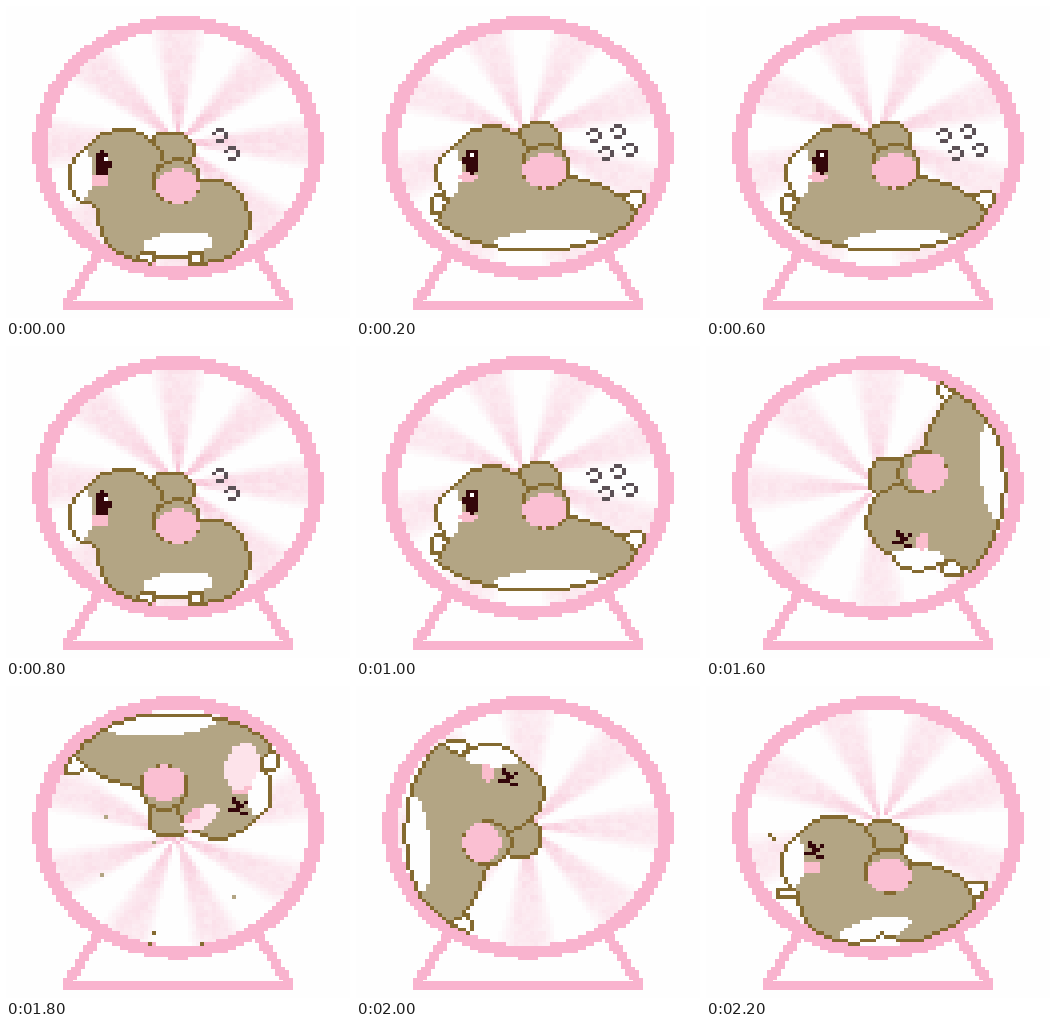
An HTML page with a canvas that plays this animation: 344 px wide and 312 px high, repeating every 2400 ms.

```html
<!DOCTYPE html>
<html lang="en">
<head>
<meta charset="utf-8">
<title>Hamster wheel</title>
<style>
html, body { margin: 0; width: 100%; height: 100%; overflow: hidden; background: #fefefe; }
canvas { display: block; width: 344px; height: 312px; }
</style>
</head>
<body>
<canvas id="stage" width="344" height="312"></canvas>
<script>
const ctx = document.getElementById('stage').getContext('2d');

// Coarse pixel grid: cells are slightly wider than tall.
const CW = 4, CH = 3.628, X0 = -2, Y0 = -1.33, N = 88;
const CX = 172, CY = 141.5;
const PINK = '#f9b3ce', EAR = '#fabfd2', CHEEK = '#fabdcc', FUR = '#b3a584',
      LINE = '#846a30', WHITE = '#fefefe', DARK = '#34060a', SWEAT = '#5c5156',
      BLUSH = '#fde3ea';

const midX = i => X0 + (i + 0.5) * CW;
const midY = j => Y0 + (j + 0.5) * CH;

// Shapes are tests on a point, combined with any / both / minus.
function oval(x, y, rx, ry, tilt = 0) {
  const c = Math.cos(tilt), s = Math.sin(tilt);
  return (px, py) => {
    const dx = px - x, dy = py - y;
    return Math.hypot((dx * c + dy * s) / rx, (dy * c - dx * s) / ry) < 1;
  };
}
const any = (...fs) => (x, y) => fs.some(f => f(x, y));
const both = (a, b) => (x, y) => a(x, y) && b(x, y);
const minus = (a, b) => (x, y) => a(x, y) && !b(x, y);

const rim = oval(CX, CY, 145, 131.5);
const hole = oval(CX, CY, 130, 118);
const reach = oval(CX, CY, 133, 120);

// Rotation about the hub in grid proportions, then a shift.
let spin = { angle: 0, dx: 0, dy: 0 };
function rotate(x, y, angle) {
  const u = (x - CX) / CW, v = (y - CY) / CH, c = Math.cos(angle), s = Math.sin(angle);
  return [CX + (u * c - v * s) * CW, CY + (u * s + v * c) * CH];
}
const toLocal = (x, y) => rotate(x - spin.dx, y - spin.dy, -spin.angle);
function toStage(x, y) {
  const [a, b] = rotate(x, y, spin.angle);
  return [a + spin.dx, b + spin.dy];
}

function cell(i, j, color, pad = 0) {
  const x = Math.round(X0 + i * CW), y = Math.round(Y0 + j * CH);
  const w = Math.round(X0 + (i + 1) * CW) - x, h = Math.round(Y0 + (j + 1) * CH) - y;
  ctx.fillStyle = color;
  ctx.fillRect(x - pad, y - pad, w + 2 * pad, h + 2 * pad);
}

function eachCell(fn) {
  for (let j = 0; j < N; j++) for (let i = 0; i < N; i++) fn(i, j, midX(i), midY(j));
}

function fill(shape, color) {
  const mask = new Uint8Array(N * N);
  eachCell((i, j, x, y) => {
    if (!reach(x, y) || !shape(...toLocal(x, y))) return;
    mask[j * N + i] = 1;
    cell(i, j, color);
  });
  return mask;
}

function outline(mask) {
  eachCell((i, j) => {
    const k = j * N + i;
    if (mask[k] && !(mask[k - 1] && mask[k + 1] && mask[k - N] && mask[k + N])) cell(i, j, LINE);
  });
}

const inked = (shape, color) => outline(fill(shape, color));

function stamp(x, y, rows, color) {
  [x, y] = toStage(x, y);
  const i0 = Math.round((x - X0) / CW - rows[0].length / 2);
  const j0 = Math.round((y - Y0) / CH - rows.length / 2);
  rows.forEach((row, j) => [...row].forEach((c, i) => { if (c === '#') cell(i0 + i, j0 + j, color); }));
}

const DROP = ['.##.', '#..#', '...#', '.##.'];
const CROSS = ['.#...', '.##.#', '..##.', '###..', '...##'];
const dots = (color, ...at) => at.forEach(([x, y]) => stamp(x, y, ['#'], color));
const drops = (...at) => at.forEach(([x, y]) => stamp(x, y, DROP, SWEAT));

function hash(i, j) {
  const v = Math.sin(i * 127.1 + j * 311.7) * 43758.5453;
  return v - Math.floor(v);
}

// Soft blotchy rays, eight around the hub.
function rays(phase, power, hubX, hubY) {
  eachCell((i, j, x, y) => {
    if (!hole(x, y)) return;
    const dx = (x - hubX) / CW, dy = (y - hubY) / CH, r = Math.hypot(dx, dy) / 32;
    const a = Math.atan2(dx, -dy) * 180 / Math.PI - phase;
    const off = a - 45 * Math.round(a / 45);
    const grain = 0.7 + 0.25 * hash(i, j) + 0.35 * hash(i >> 1, j >> 1);
    const s = power * grain * Math.exp(-Math.pow(off / 11, 4)) * (0.28 + 0.65 * Math.exp(-r * 3.5));
    if (s > 0.03) cell(i, j, `rgb(${254 - 7 * s | 0},${254 - 80 * s | 0},${254 - 54 * s | 0})`);
  });
}

function wheel(phase, power, hubX, hubY) {
  ctx.fillStyle = WHITE;
  ctx.fillRect(0, 0, 344, 312);
  eachCell((i, j, x, y) => {
    const t = (y - 246) / 52, lean = Math.abs(x - CX);
    const leg = t > 0 && t < 1 && Math.abs(lean - (78 + 33 * t)) < 4.5;
    const bar = y > 295 && y < 305 && lean < 115;
    if (!rim(x, y) && (leg || bar)) cell(i, j, PINK, 1);
  });
  eachCell((i, j, x, y) => { if (rim(x, y)) cell(i, j, hole(x, y) ? WHITE : PINK); });
  rays(phase, power, hubX, hubY);
}

// The face and ears hang off the head; drop lowers the ears.
function hamster({ head: [x, y], drop, trunk, belly, limbs = [], feet = [], dizzy }) {
  const earX = x + 54, earY = y + drop;
  const skull = any(oval(x, y, 45, 46), oval(x - 35, y + 3, 21, 27));
  const shape = any(skull, trunk);
  limbs.forEach(limb => inked(limb, WHITE));
  inked(oval(x + 48, y - 30 + drop / 2, 24, 20), FUR);
  const mask = fill(shape, FUR);
  fill(both(shape, any(oval(x - 47, y, 17, 30), belly)), WHITE);
  outline(mask);
  feet.forEach(foot => inked(foot, WHITE));
  fill(oval(x - 23, y + 6, 10, 6), CHEEK);
  if (dizzy) {
    stamp(x - 20, y - 11, CROSS, DARK);
  } else {
    fill(oval(x - 20, y - 10, 7.5, 13), DARK);
    dots(WHITE, [x - 18, y - 14]);
  }
  inked(oval(earX, earY - 5, 25, 23), FUR);
  fill(oval(earX, earY, 22, 17), EAR);
}

function run() {
  wheel(0, 1, 172, 137);
  hamster({
    head: [117, 168], drop: 12,
    trunk: minus(any(oval(145, 206, 55, 53), oval(200, 215, 45, 44)), oval(165, 263, 22, 12)),
    belly: oval(172, 238, 36, 12, -0.1),
    feet: [oval(141, 252, 10, 8), oval(190, 252, 10, 8)]
  });
  drops([214, 131], [225, 149]);
}

const stretch = (drop, dizzy) => hamster({
  head: [135, 165], drop, dizzy,
  trunk: both(oval(178, 185, 112, 62), oval(182, 225, 105, 58)),
  belly: oval(190, 236, 55, 13, -0.08),
  limbs: [oval(83, 199, 10, 12), oval(276, 195, 15, 10, -0.6)]
});

function leap(sweating) {
  wheel(25, 0.85, 170, 130);
  stretch(0, false);
  if (sweating) drops([237, 128], [261, 124], [249, 146], [272, 142]);
}

// Thrown round by the wheel, a number of quarter turns.
function carried(quarters, dx, dy) {
  spin = { angle: quarters * Math.PI / 2, dx, dy };
  stretch(11, true);
  spin = { angle: 0, dx: 0, dy: 0 };
}

function overhead() {
  wheel(25, 0.9, 170, 150);
  carried(2, 3, -10);
  fill(oval(236, 80, 17, 24, 0.3), BLUSH);
  fill(oval(194, 132, 20, 10, -0.5), BLUSH);
  fill(oval(186, 130, 11, 5, -0.5), EAR);
  dots(FUR, [101, 130], [94, 188], [147, 157], [227, 212]);
  dots(LINE, [147, 247], [142, 257], [194, 257]);
}

function landed() {
  wheel(26, 0.85, 175, 136);
  hamster({
    head: [129, 175], drop: 15, dizzy: true,
    trunk: any(oval(145, 212, 54, 47), oval(210, 217, 59, 40)),
    belly: oval(170, 243, 36, 11, -0.2),
    limbs: [oval(82, 207, 14, 7), oval(268, 204, 15, 10, -0.4)]
  });
  dots(LINE, [67, 154], [63, 148]);
}

const scenes = [
  ...Array.from({ length: 8 }, (_, k) => k % 2 ? () => leap(k < 7) : run),
  () => { wheel(0, 0.85, 172, 141); carried(-1, 12, 0); },
  overhead,
  () => { wheel(0, 0.85, 172, 141); carried(1, -8, 0); },
  landed
];

const start = performance.now();
let shown = -1;
function tick() {
  const k = Math.floor((performance.now() - start) / 200) % scenes.length;
  if (k !== shown) {
    scenes[k]();
    shown = k;
  }
  requestAnimationFrame(tick);
}
tick();
</script>
</body>
</html>
```
